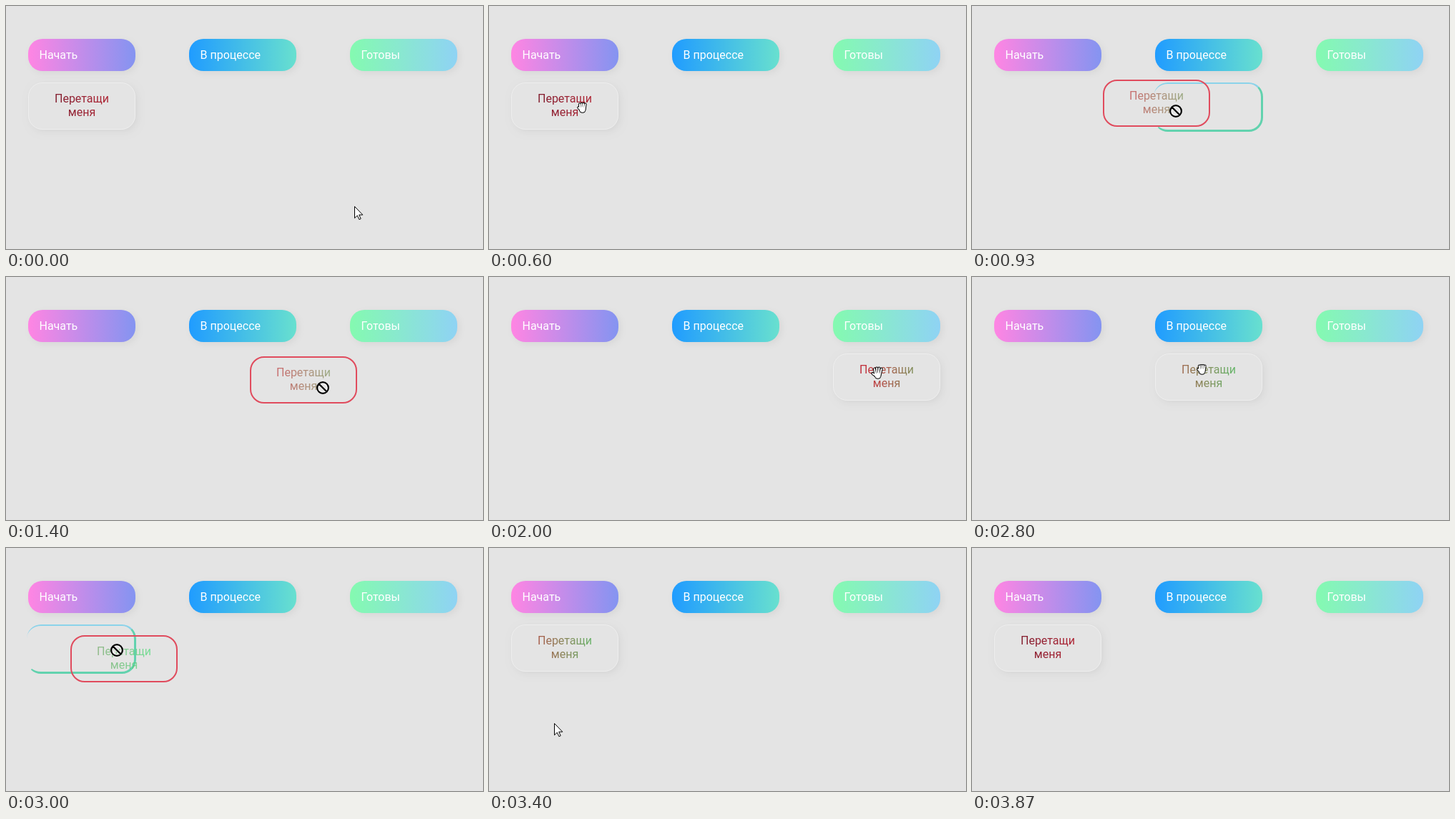
An HTML page with a canvas for the animation above (3940 ms loop, 667x340 px).

```html
<!DOCTYPE html>
<html lang="ru">
<head>
<meta charset="utf-8">
<title>Перетащи меня</title>
<style>
html, body { margin: 0; width: 100%; height: 100%; overflow: hidden; background: #e4e4e4; }
canvas { display: block; }
</style>
</head>
<body>
<canvas id="stage" width="667" height="340"></canvas>
<script>
const ctx = document.getElementById('stage').getContext('2d');
const LOOP = 3940, BG = '#e4e4e4';
const CARD_W = 150, CARD_H = 66, CARD_Y = 107;

const columns = [
  { x: 31, label: 'Начать', from: '#ff85e3', to: '#8494f1' },
  { x: 256, label: 'В процессе', from: '#209cff', to: '#68e0cf' },
  { x: 481, label: 'Готовы', from: '#84fab0', to: '#8fd3f4' }
];

// turning points of the pointer: step, x, y
const path = [
  [0, 487, 280], [6, 130, 141], [9, 130, 141],
  [11, 165, 164], [16, 358, 137], [21, 443, 155], [25, 566, 134],
  [30, 543, 134], [32, 543, 134], [37, 347, 132],
  [42, 321, 128], [45, 155, 143], [47, 74, 153], [56, 114, 350]
];

// where the card is held (dx, dy), and the tint of its text
const drags = [
  { start: 10, end: 26, to: 2, dx: 102, dy: 44, tint: [1.1, 1.6] },
  { start: 33, end: 41, to: 1, dx: 62, dy: 30, tint: [1, 1.08] },
  { start: 43, end: 48, to: 0, dx: 65, dy: 21, tint: [1.7, 2] }
];

const ramp = [[20, 10, 30], [205, 45, 60], [75, 220, 120]];

const mix = (a, b, k) => a + (b - a) * k;
const clamp = k => Math.max(0, Math.min(1, k));

// smooth curve through the turning points, without overshoot
function pointer(n) {
  const last = path.length - 1;
  let i = 0;
  while (i < last - 1 && path[i + 1][0] <= n) i++;
  const a = path[i], b = path[i + 1], span = b[0] - a[0];
  const k = clamp((n - a[0]) / span);
  return [1, 2].map(c => {
    const slope = j => j < 0 || j >= last ? 0 : (path[j + 1][c] - path[j][c]) / (path[j + 1][0] - path[j][0]);
    const speed = j => {
      const u = slope(j - 1), v = slope(j);
      return u * v > 0 ? 2 * u * v / (u + v) : 0;
    };
    const ease = k * k * (3 - 2 * k), bend = k * (1 - k) * span;
    return mix(a[c], b[c], ease) + bend * ((1 - k) * speed(i) - k * speed(i + 1));
  });
}

// text tint runs from dark red towards green, then quickly back
function restTint(n) {
  const k = clamp(Math.min((n - 9) / 40, (58 - n) / 9));
  const mid = 0.72 + 1.03 * k, half = 0.125 + 0.2 * Math.sin(Math.PI * k);
  return [mid - half, mid + half];
}

function tone(u) {
  const i = Math.min(1, Math.floor(u));
  return `rgb(${ramp[i].map((c, j) => Math.round(mix(c, ramp[i + 1][j], u - i)))})`;
}

function box(x, y, w, h, r) {
  ctx.beginPath();
  ctx.roundRect(x, y, w, h, r);
}

function raised(x, y, w, h, fill, shade) {
  ctx.save();
  ctx.shadowColor = `rgba(0,0,0,${shade})`;
  ctx.shadowOffsetX = ctx.shadowOffsetY = 3;
  ctx.shadowBlur = 10;
  ctx.fillStyle = fill;
  box(x, y, w, h, 20);
  ctx.fill();
  ctx.restore();
}

function write(text, x, y, align, fill) {
  ctx.font = '400 16px Roboto, sans-serif';
  ctx.textAlign = align;
  ctx.fillStyle = fill;
  ctx.fillText(text, x, y);
}

function drawLabel({ x, label, from, to }) {
  const g = ctx.createLinearGradient(x, 0, x + CARD_W, 0);
  g.addColorStop(0, from);
  g.addColorStop(1, to);
  raised(x, 46, CARD_W, 45, g, 0.06);
  write(label, x + 15.5, 74, 'left', '#fff');
}

function drawText(x, y, [left, right]) {
  const g = ctx.createLinearGradient(x + 36, 0, x + 114, 0);
  for (let k = 0; k <= 1; k += 0.25) g.addColorStop(k, tone(mix(left, right, k)));
  write('Перетащи', x + 75, y + 28, 'center', g);
  write('меня', x + 75, y + 47, 'center', g);
}

function drawCard(x, tint) {
  raised(x, CARD_Y, CARD_W, CARD_H, BG, 0.06);
  ctx.strokeStyle = '#eeeeee';
  ctx.lineWidth = 1;
  box(x + 0.5, CARD_Y + 0.5, CARD_W - 1, CARD_H - 1, 19.5);
  ctx.stroke();
  drawText(x, CARD_Y, tint);
}

function drawGhost(x, y, tint) {
  ctx.strokeStyle = '#e04b5d';
  ctx.lineWidth = 2;
  box(x + 1, y + 1, CARD_W - 2, CARD_H - 2, 19);
  ctx.stroke();
  ctx.globalAlpha = 0.72;
  drawText(x, y, tint);
  ctx.globalAlpha = 1;
}

// drop slot: blue top edge, green right and bottom edges, open left side
function drawSlot(col) {
  const x = col.x - 2, y = CARD_Y, r = x + 153, b = y + 69;
  const side = (color, points) => {
    ctx.save();
    ctx.beginPath();
    points.forEach(p => ctx.lineTo(...p));
    ctx.clip();
    box(x, y, 153, 69, 20);
    ctx.roundRect(x, y + 2, 150, 64,
      [{ x: 20, y: 18 }, { x: 17, y: 18 }, { x: 17, y: 17 }, { x: 20, y: 17 }]);
    ctx.fillStyle = color;
    ctx.fill('evenodd');
    ctx.restore();
  };
  side('#8bd3ea', [[x, y], [r, y], [r - 20, y + 20], [x, y + 20]]);
  side('#62d2ae', [[r, y], [r, b], [x, b], [x + 20, b - 20], [r - 20, y + 20]]);
}

const arrow = new Path2D('M.5 .5V16.8L4.3 13.2L6.9 18.7L9.2 17.7L6.7 12.2H11.8Z');

function drawArrow() {
  ctx.fill(arrow);
  ctx.stroke(arrow);
}

// four fingers, a thumb and a palm: black first, then a thinner white on top
function drawHand(open) {
  ctx.lineCap = 'round';
  for (const [color, edge] of [['#000', 1], ['#fff', 0]]) {
    ctx.strokeStyle = ctx.fillStyle = color;
    ctx.lineWidth = 2 + 2 * edge;
    ctx.beginPath();
    for (let i = 0; i < 4; i++) {
      const x = -3.2 + 2.6 * i, drop = Math.abs(i - 1.5);
      ctx.moveTo(x * 0.8, 3);
      ctx.lineTo(open ? x * 1.25 : x, (open ? -7.2 : -4.2) + drop * (open ? 1.2 : 0.5));
    }
    ctx.moveTo(-1, 5);
    ctx.lineTo(open ? -6.6 : -4.8, 1.2);
    ctx.stroke();
    ctx.beginPath();
    ctx.ellipse(0.7, 4, 3.8 + edge, 3.8 + edge, 0, 0, 2 * Math.PI);
    ctx.fill();
  }
}

function drawBan() {
  for (const [color, width, r] of [['#f4f4f4', 4, 7.2], ['#000', 2.2, 7.9]]) {
    ctx.strokeStyle = color;
    ctx.lineWidth = width;
    ctx.beginPath();
    ctx.arc(0, 0, r, 0, Math.PI * 2);
    ctx.moveTo(-5.4, -5.4);
    ctx.lineTo(5.4, 5.4);
    ctx.stroke();
  }
}

function drawCopy() {
  ctx.save();
  ctx.setLineDash([1, 1]);
  ctx.lineWidth = 2;
  ctx.strokeRect(3, 17, 9, 6);
  ctx.restore();
  ctx.fillRect(10.5, 20.5, 10, 10);
  ctx.strokeRect(10.5, 20.5, 10, 10);
  ctx.beginPath();
  ctx.moveTo(13, 25.5);
  ctx.lineTo(18, 25.5);
  ctx.moveTo(15.5, 23);
  ctx.lineTo(15.5, 28);
  ctx.stroke();
  drawArrow();
}

const cursors = {
  arrow: drawArrow,
  copy: drawCopy,
  ban: drawBan,
  hand: () => drawHand(true),
  fist: () => drawHand(false)
};

function drawCursor(kind, x, y) {
  ctx.save();
  ctx.translate(Math.round(x), Math.round(y));
  ctx.fillStyle = '#fff';
  ctx.strokeStyle = '#000';
  ctx.lineWidth = 1;
  cursors[kind]();
  ctx.restore();
}

const columnAt = x => columns.find(c => x >= c.x && x <= c.x + CARD_W);

function draw(n) {
  ctx.fillStyle = BG;
  ctx.fillRect(0, 0, 667, 340);
  columns.forEach(drawLabel);

  const [px, py] = pointer(n);
  const drag = drags.find(d => n >= d.start && n <= d.end);
  let cursor = 'arrow';

  if (drag) {
    const slot = columnAt(px);
    if (slot) drawSlot(slot);
    if (n < drag.end) {
      drawGhost(Math.round(px - drag.dx), Math.round(py - drag.dy), drag.tint);
      // the cursor shape follows one step late
      cursor = columnAt(pointer(n - 1)[0]) ? 'copy' : 'ban';
    }
  } else {
    const last = drags.filter(d => n > d.end).pop();
    const home = columns[last ? last.to : 0];
    drawCard(home.x, restTint(n));
    const over = columnAt(px) === home && py >= CARD_Y && py <= CARD_Y + CARD_H;
    if (over) cursor = drags.some(d => n === d.start - 1) ? 'fist' : 'hand';
  }
  drawCursor(cursor, px, py);
}

// fifteen steps a second, on starts of 0, 70 and 130 ms in each 200
function stepAt(t) {
  const r = t % 200;
  return 3 * Math.floor(t / 200) + (r >= 130 ? 2 : r >= 70 ? 1 : 0);
}

const begin = performance.now();
function tick() {
  draw(stepAt((performance.now() - begin) % LOOP));
  requestAnimationFrame(tick);
}
tick();
</script>
</body>
</html>
```
